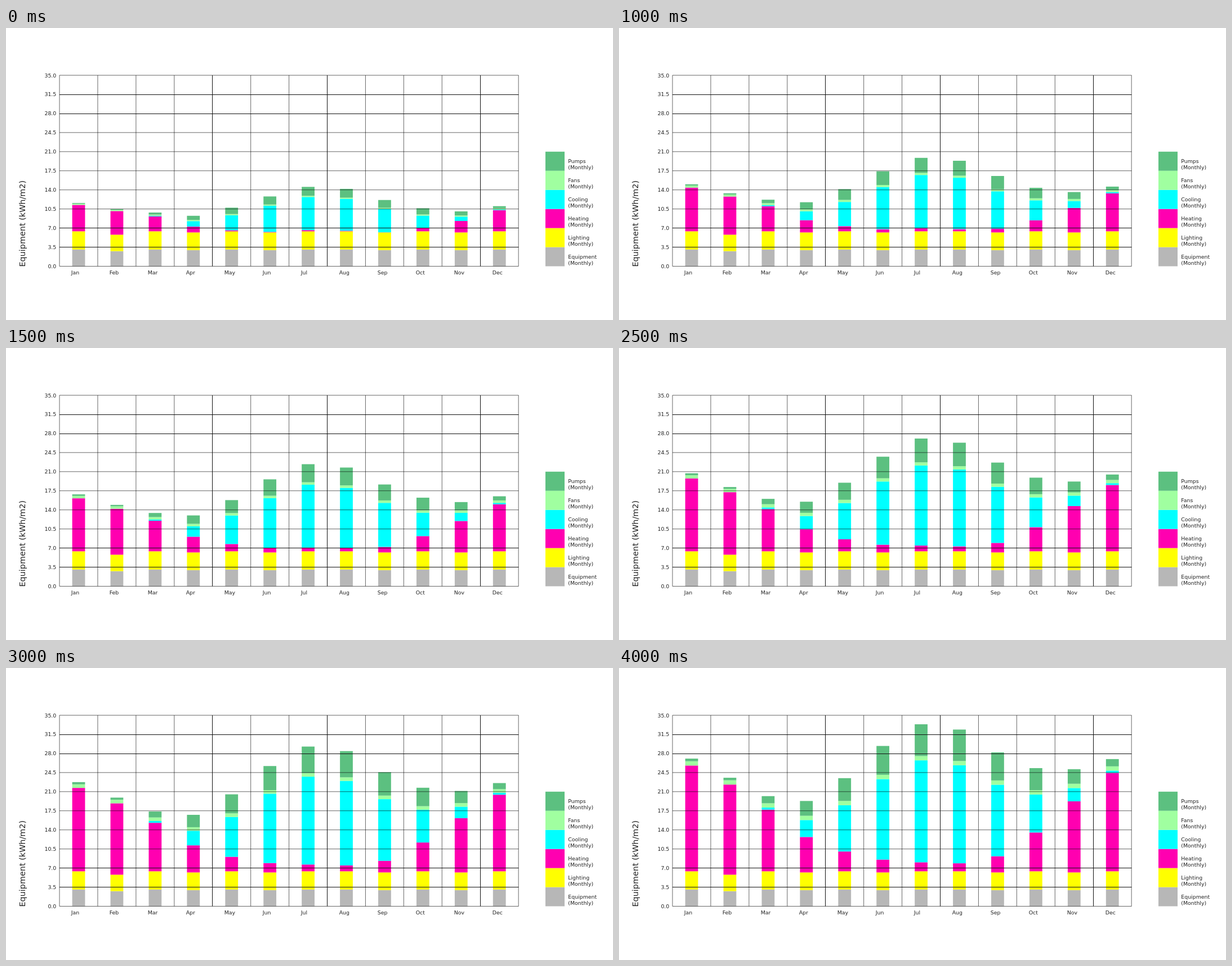
Recreate the animation shown at these times as an HTML page. Size 1078x519 px, loop 4500 ms.

```html
<!DOCTYPE html>
<html lang="en">
<head>
<meta charset="utf-8">
<title>Monthly energy use</title>
<style>
  html, body { margin: 0; width: 100%; height: 100%; overflow: hidden; background: #fff; }
  svg { display: block; font: 9.4px "DejaVu Sans", sans-serif; fill: #222; }
</style>
</head>
<body>
<svg width="1078" height="519" viewBox="0 0 1078 519">
  <g id="bars"></g>
  <g id="frame"></g>
</svg>
<script>
const LEFT = 95, TOP = 84, BASE = 423.5, ROW = 33.95, COL = 67.93;
const STEPS = 9, STEP_MS = 500;
const MONTHS = 'Jan Feb Mar Apr May Jun Jul Aug Sep Oct Nov Dec'.split(' ');

// Stacking order, bottom to top
const series = [
  ['Equipment', '#b7b7b7'], ['Lighting', '#ffff00'], ['Heating', '#ff00b0'],
  ['Cooling', '#00ffff'], ['Fans', '#a0ffa0'], ['Pumps', '#5cc080'],
];

const rect = (x, y, w, h, fill) =>
  `<rect x="${x}" y="${y}" width="${w}" height="${h}" fill="${fill}"/>`;
const text = (x, y, label, attrs = '') => `<text x="${x}" y="${y}" ${attrs}>${label}</text>`;

// Yearly cycle: a mean plus a yearly and a half-yearly wave, never below zero
function season(month, mean, cos1, sin1, cos2, sin2) {
  const a = month * Math.PI / 6;
  return Math.max(0, mean + cos1 * Math.cos(a) + sin1 * Math.sin(a)
    + cos2 * Math.cos(2 * a) + sin2 * Math.sin(2 * a));
}

const mix = (a, b, p) => a + (b - a) * p;
const ease = (p, bend) => p + bend * p * (1 - p);

// Segment heights in px for one month, p running from 0 to 1
function heights(month, p) {
  const days = new Date(2023, month + 1, 0).getDate();
  const growth = mix(0.28, 1, ease(p, 0.11));
  const heating = mix(season(month, 16.3, 22.4, 2.2, 8.2, 1.3),
    season(month, 84, 86, -3, 18, -6.7), ease(p, -0.17));
  const cooling = season(month, 69.5, -91, -18.7, 20.7, 7.2) * mix(0.325, 1, ease(p, 0.24));
  const pumps = season(month, 31.7, -25.9, -6.5, -1.1, -1.1) * growth;
  return [days * 0.96, days * 1.045, heating, cooling, 7.6 * growth, pumps];
}

function drawFrame() {
  let out = '';
  // Dark lines sit on whole pixels, the others are softened between two
  const line = (at, dark) => dark ? [Math.floor(at + 0.2), '#111'] : [at - 0.5, 'rgba(0,0,0,.6)'];
  for (let i = 0; i <= 10; i++) {
    const y = TOP + i * ROW;
    const [top, color] = line(y, [1, 2, 8, 9].includes(i));
    out += rect(LEFT, top, 815.3, 1, color);
    out += text(89.3, y + 3.5, (35 - 3.5 * i).toFixed(1), 'text-anchor="end"');
  }
  for (let i = 0; i <= 12; i++) {
    const [left, color] = line(LEFT + i * COL, [4, 7, 11].includes(i));
    out += rect(left, TOP, 1, BASE - TOP, color);
  }
  MONTHS.forEach((name, i) => out += text(115.7 + i * 68, 437.6, name));
  series.forEach(([name, color], i) => {
    const y = BASE - (i + 1) * ROW;
    out += rect(958, y, 34, ROW, color);
    out += text(998.3, y + 20.6, name) + text(998.3, y + 31.2, '(Monthly)');
  });
  out += text(0, 0, 'Equipment (kWh/m2)', 'transform="translate(34 424.5) rotate(-90)" font-size="14.4"');
  document.getElementById('frame').innerHTML = out;
}

function drawBars(step) {
  let out = '';
  MONTHS.forEach((_, month) => {
    let y = BASE;
    heights(month, step / (STEPS - 1)).forEach((h, k) => {
      y -= h;
      out += rect(117.6 + month * COL, y, 22.8, h, series[k][1]);
    });
  });
  document.getElementById('bars').innerHTML = out;
}

let shown = -1;
function tick() {
  const step = Math.floor(performance.now() / STEP_MS) % STEPS;
  if (step !== shown) drawBars(shown = step);
  requestAnimationFrame(tick);
}
drawFrame();
tick();
</script>
</body>
</html>
```
